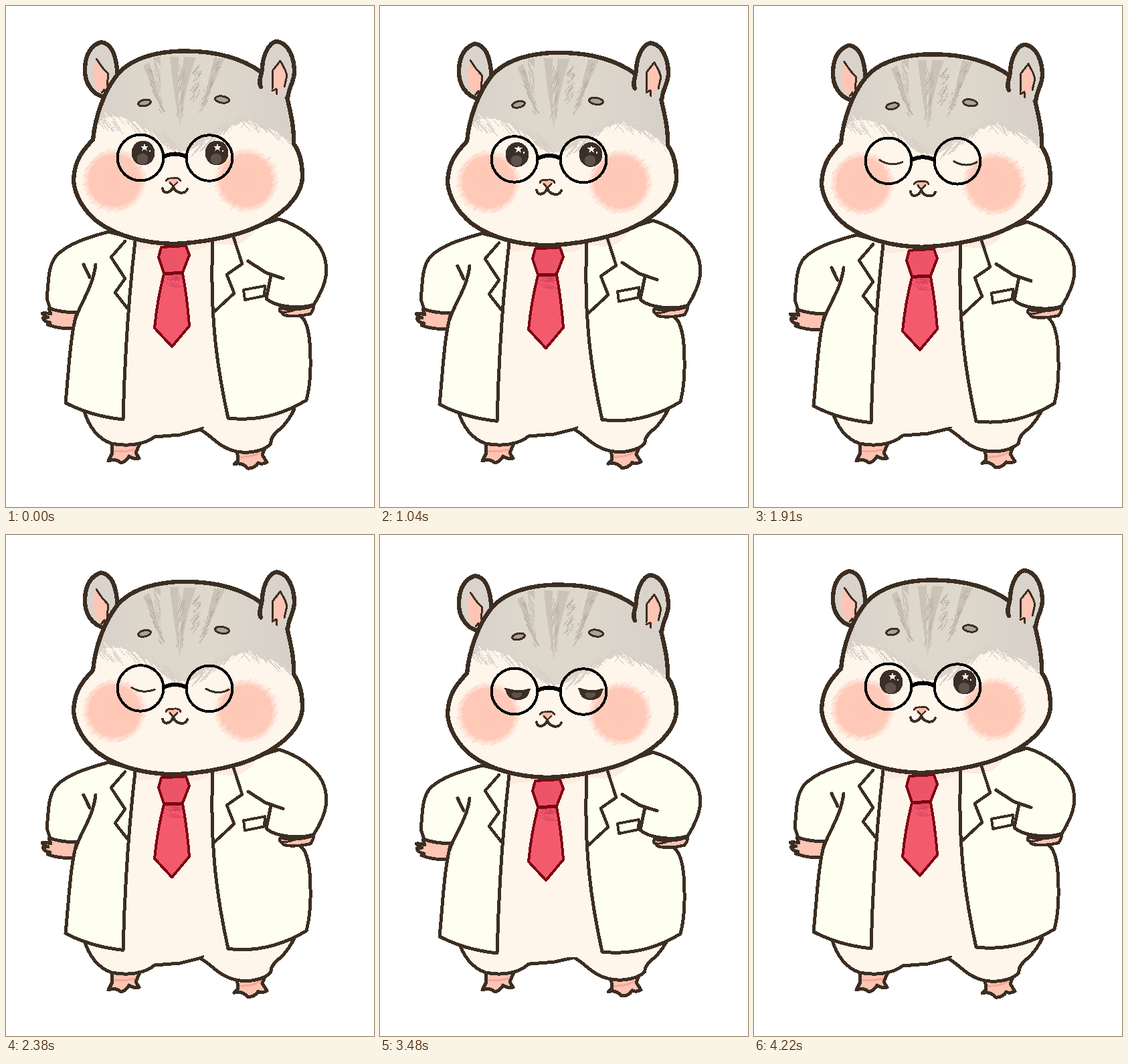
An HTML page that plays this animation: 550x750 px, repeating every 4.29 s.

```html
<!DOCTYPE html>
<html lang="en">
<head>
<meta charset="utf-8">
<title>Hamster in a lab coat</title>
<style>
  html, body { margin: 0; width: 100%; height: 100%; overflow: hidden; background: #fff; }
  svg { display: block; width: 100vw; height: 100vh; shape-rendering: crispEdges; }
  .ink { stroke: #3c2e22; stroke-linecap: round; stroke-linejoin: round; }
  .line { fill: none; }
  .coat { fill: #fefff0; }
  .fur { fill: #fef6eb; }
  .skin { fill: #fec4b4; }
  .tie { stroke: #7d0713; stroke-width: 4; stroke-linejoin: round; }
</style>
</head>
<body>
<svg viewBox="0 0 550 750" fill="none">
  <defs>
    <radialGradient id="blush">
      <stop offset="0" stop-color="#ffc8b6"/>
      <stop offset=".8" stop-color="#ffc9b8"/>
      <stop offset="1" stop-color="#ffd6c8" stop-opacity="0"/>
    </radialGradient>
    <linearGradient id="cap" x1="131" x2="430" y1="0" y2="0" gradientUnits="userSpaceOnUse">
      <stop offset="0" stop-color="#d8d1ca"/>
      <stop offset=".28" stop-color="#ded7cc"/>
      <stop offset=".6" stop-color="#ded7cc"/>
      <stop offset="1" stop-color="#d7d0c9"/>
    </linearGradient>
    <path id="skull" d="M167 102C186 80 215 71 250 68C305 65 350 76 383 100L420 136C425 160 431 180 430 206C440 220 443 236 443 257C441 290 405 322 350 340C315 350 285 355 250 356C205 355 168 345 138 324C115 306 103 283 101 262C102 232 113 218 130 200C133 167 146 128 167 102Z"/>
    <clipPath id="inHead"><use href="#skull"/></clipPath>
    <path id="blade" d="M236 401L264 400Q271 438 274 479L248 510L222 482Q226 440 236 401Z"/>
    <clipPath id="inTie"><use href="#blade"/></clipPath>
    <g id="star"><path d="M0 -6L1.6 -2L5.8 -2L2.5 .8L3.8 5L0 2.5L-3.8 5L-2.500 .8L-5.8 -2L-1.6 -2Z"/><circle cx="8" cy="5" r="1.3"/></g>
  </defs>

  <!-- feet and legs -->
  <g class="ink" stroke-width="5">
    <path class="skin" d="M158 655L159 669L153 681Q164 677 172 684Q180 682 184 674Q191 679 199 677L194 669L200 655Z"/>
    <path class="skin" data-flex="M345 664@-.3L347 680@-.3L341 686@-.3Q352 682@-.3 361 692@-.3Q371 693@-.3 377 684@-.3Q383 687@-.3 390 683@-.3L383 672@-.3L389 657@-.3Z"/>
    <path d="M162 666Q178 668 192 664M350 675Q367 676 380 668" stroke="#f7a695" stroke-width="3"/>
    <path class="fur" data-flex="M116 604C122 624@0 134 647@0 158 655@0C182 660@0 208 656@0 222 645@-.4L260 642@-.4L290 634@-.2C309 644@-.2 317 661@-.2 345 667@-.3C366 671@-.3 387 665@-.3 396 655@-.2C395 646@0 402 639@0 411 632@0Q424 619@0 431 603@0L400 560@0L150 560@0Z"/>
    <path class="line" stroke-width="3" data-flex="M275 638@-.2L295 631@-.1"/>
  </g>

  <!-- left hand -->
  <path class="ink skin" stroke-width="4.8" data-flex="M106 456@.5L64 453@.4L67 461@.4Q60 459@.3 54 460@.3Q58 465@.3 63 466@.3L55 467@.3Q57 473@.4 66 474@.4L62 477@.4C78 483@.4 90 483@.5 103 482@.5Z"/>

  <!-- coat -->
  <g class="ink coat" stroke-width="5">
    <path data-flex="M193 348@1L153 338@1C128 345@1 94 354@.9 75 374@.7C62 391@.6 64 412@.4 61 438@.4L66 453@.4Q84 459@.4 106 459@.4C96 492@.7 94 544@.9 89 594@1Q127 614@1 175 619@1C177 540@1 183 440@1 193 352@1Z"/>
    <path data-flex="M309 350@1L408 319@.9C434 327@.8 462 345@.7 473 368@.6C483 392@.4 481 414@.4 460 447@.5L440 464@.7C451 471@1 455 498@1 455 528@1Q456 563@1 449 590@1C423 606@1 383 623@1 332 617@1C316 544@1 304 465@1 309 350@1Z"/>
    <path class="skin" stroke-width="4.5" data-flex="M410 452@.5Q407 458@.5 414 459@.5Q411 463@.5 424 464@.5Q439 465@.5 455 461@.5Q460 455@.5 460 448@.5C449 454@.5 424 456@.5 410 452@.5Z"/>
    <path class="line" stroke-width="3" data-flex="M414 459@.5Q423 458@.5 432 455@.5"/>
    <path class="line" data-flex="M134 387@1C130 421@.8 111 445@.5 104 468@.5M116 387@1L125 406@.9"/>
    <path class="line" data-flex="M362 382@.9L388 399@.8L414 408@.7M396 403@.7L389 438@.5C400 449@.5 436 455@.5 460 447@.5"/>
  </g>

  <g class="upper">
    <path class="fur" d="M193 345L311 345C307 430 309 500 332 617L310 626L175 620C177 530 183 440 193 345Z"/>
    <path d="M190 349Q240 362 310 351L374 331Q366 352 340 358L306 355Q290 370 272 364L230 362L194 366Z" fill="#feeade"/>
    <path class="ink line" stroke-width="5" d="M193 352C183 440 177 540 175 619M309 350C304 465 316 544 332 617"/>
    <g class="ink line" stroke-width="4.6">
      <path d="M178 352L157 376L178 408L163 429L181 452"/>
      <path d="M340 346L353 386L330 402L341 430L312 457"/>
      <path class="coat" d="M355 425L387 419L386 434L357 440Z" stroke-width="4"/>
    </g>
    <path class="tie" d="M232 361L269 359L274 373L264 399L236 400L228 376Z" fill="#ee5468"/>
    <use href="#blade" class="tie" fill="#f35b6d"/>
    <g id="tieShade" clip-path="url(#inTie)"></g>
    <use href="#blade" class="tie"/>
  </g>

  <!-- head -->
  <g class="upper">
    <path class="ink" fill="#dad3cb" stroke-width="6.4" d="M149 137C127 133 117 113 118 93C119 69 130 58 142 54C156 56 165 69 167 107"/>
    <path class="skin" d="M134 80L144 92L153 101L155 112L148 134L137 126Q127 108 134 80Z"/>
    <path class="ink line" stroke-width="3" d="M135 79L144 92L153 102L151 119M143 130L147 125L147 134"/>
    <use href="#skull" class="fur"/>
    <g clip-path="url(#inHead)">
      <path d="M125 190L145 168Q174 161 204 180L258 216Q278 221 297 200Q325 181 357 173Q388 174 432 207L440 50L125 50Z" fill="url(#cap)"/>
      <g id="edge"></g>
      <g fill="#cbc3b6">
        <path d="M205 90Q218 120 235 164Q226 120 214 84Z"/>
        <path d="M221 77L231 76Q229 115 234 150Q221 112 221 77Z"/>
        <path d="M245 76L258 76Q256 118 260 182Q250 126 245 76Z"/>
        <path d="M266 76L284 77Q270 112 260 178Q260 118 266 76Z"/>
        <path d="M311 77L327 79Q313 108 290 163Q301 118 311 77Z"/>
      </g>
      <g id="stripes"></g>
      <circle cx="162" cy="261" r="48" fill="url(#blush)"/>
      <circle cx="359" cy="261" r="48" fill="url(#blush)"/>
      <g id="blushEdge"></g>
    </g>
    <use href="#skull" class="ink" stroke-width="6.4"/>
    <path fill="#dad3cb" d="M381 122L383 92L392 65L405 53L422 60L432 90L429 112L420 137Q400 134 381 122Z"/>
    <path class="ink line" stroke-width="6.4" d="M381 121C376 113 383 102 383 92C384 73 393 55 404 53C422 55 431 77 431 99C430 116 422 122 421 139"/>
    <path class="skin" d="M399 96L410 82L420 103Q416 127 401 133Q395 116 399 96Z"/>
    <path class="ink line" stroke-width="3" d="M398 124L399 96L410 82L417 95L420 104L416 121M398 127L404 124L405 132"/>

    <g class="ink" fill="#aaa197" stroke-width="3">
      <ellipse cx="207" cy="145" rx="9.5" ry="4.6" transform="rotate(-12 207 145)"/>
      <ellipse cx="323" cy="140" rx="10.5" ry="5" transform="rotate(8 323 140)"/>
    </g>

    <g class="eyes">
      <g fill="#3b2e29"><ellipse cx="205" cy="220" rx="17.5" ry="18.5"/><ellipse cx="315" cy="220" rx="17.5" ry="18.5"/></g>
      <g fill="#5f524a"><ellipse cx="204" cy="229" rx="8.5" ry="8"/><ellipse cx="314" cy="229" rx="8.5" ry="8"/></g>
      <g fill="#fff"><use href="#star" x="207" y="212"/><use href="#star" x="316" y="212"/></g>
    </g>
    <g class="eyes">
      <path d="M187 223Q206 230 224 224Q222 240 206 240Q190 240 187 223ZM297 223Q315 230 333 224Q331 240 315 240Q299 240 297 223Z" fill="#3b2e29"/>
      <path d="M196 230Q205 227 213 230Q211 237 204 237Q198 237 196 230ZM306 230Q315 227 323 230Q321 237 314 237Q308 237 306 230Z" fill="#5f524a"/>
      <path class="ink line" stroke-width="3" d="M187 223Q206 230 224 224M297 223Q315 230 333 224"/>
    </g>
    <path class="eyes ink line" stroke-width="3" d="M188 226Q204 236 222 229M299 228Q317 238 333 229"/>

    <path d="M240 259Q250 255 260 260Q257 268 250 270Q242 267 240 259Z" fill="#fdbba9"/>
    <path class="ink line" stroke-width="2.8" d="M239 262Q241 257 249 258Q259 256 261 262M245 264L250 270L256 264"/>
    <path class="ink line" stroke-width="4" d="M234 273C235 283 247 280 250 270C253 281 268 283 271 274"/>
    <g stroke="#000" stroke-width="4">
      <circle cx="201" cy="227" r="34.3"/>
      <circle cx="304" cy="227.5" r="34.3"/>
      <path d="M235 226Q252 217 271 226" stroke-width="6"/>
    </g>
  </g>
</svg>
<script>
const $ = s => document.querySelector(s);
const all = s => [...document.querySelectorAll(s)];

let seed = 11;
const rnd = (a, b) => {
  seed = (seed * 16807) % 2147483647;
  return a + (b - a) * seed / 2147483647;
};

// Pencil strokes scattered around the line a-b
function hatch(id, a, b, n, spread, dx, dy, color, width = 1.3) {
  let d = '';
  for (let i = 0; i < n; i++) {
    const k = rnd(0, 1), len = rnd(.5, 1.1);
    const x = a[0] + (b[0] - a[0]) * k + rnd(-spread, spread) - dx * len / 2;
    const y = a[1] + (b[1] - a[1]) * k + rnd(-spread, spread) - dy * len / 2;
    d += `M${x.toFixed(1)} ${y.toFixed(1)}l${(dx * len).toFixed(1)} ${(dy * len).toFixed(1)}`;
  }
  $(id).insertAdjacentHTML('beforeend', `<path d="${d}" stroke="${color}" stroke-width="${width}"/>`);
}

const grey = '#d9d1c8', cream = '#fef6eb';
hatch('#edge', [138, 176], [200, 180], 42, 5, 14, 18, grey);
hatch('#edge', [150, 172], [205, 188], 35, 5, 14, 18, cream);
hatch('#edge', [200, 180], [256, 214], 40, 6, 16, 20, grey);
hatch('#edge', [280, 214], [350, 174], 50, 6, -15, 18, grey);
hatch('#edge', [300, 208], [355, 180], 28, 5, -15, 18, cream);
hatch('#edge', [355, 172], [428, 204], 50, 5, 14, 16, grey);
hatch('#edge', [365, 180], [428, 210], 28, 4, 14, 16, cream);

const dark = '#b9b0a0', pale = '#e2dcd1';
hatch('#stripes', [212, 92], [232, 156], 26, 4, 6, 10, dark, 1);
hatch('#stripes', [226, 82], [231, 135], 18, 3, 4, 9, pale, 1);
hatch('#stripes', [263, 90], [260, 168], 24, 5, -4, 12, dark, 1);
hatch('#stripes', [286, 94], [282, 140], 26, 5, -7, 9, dark, 1);
hatch('#stripes', [316, 86], [293, 155], 26, 4, -7, 9, dark, 1);
hatch('#stripes', [305, 82], [294, 130], 16, 4, -5, 9, pale, 1);

for (const cx of [162, 359])
  for (let i = 0; i < 40; i++) {
    const t = i * Math.PI / 20;
    const p = [cx + 43 * Math.cos(t), 261 + 43 * Math.sin(t)];
    hatch('#blushEdge', p, p, 2, 3, 9, -7, i % 2 ? '#ffd0c0' : '#ffe3d7', 1);
  }
hatch('#tieShade', [237, 406], [266, 407], 26, 4, 10, 4, '#d94460', 1.2);
hatch('#tieShade', [240, 415], [267, 421], 12, 4, 12, 3, '#dd4760', 1);

// Breathing steps: time, depth, lids (0 open, 1 half, 2 shut)
const LOOP = 4290, drop = [0, 2.4, 4.8, 7];
const steps = [[0, 0, 0], [230, 1, 0], [400, 2, 0], [570, 3, 0], [870, 2, 0], [1040, 1, 0], [1210, 0, 0]];
for (const t of [1540, 2880])
  steps.push([t, 0, 1], [t + 70, 0, 2], [t + 200, 1, 2], [t + 370, 2, 2],
    [t + 600, 3, 1], [t + 670, 2, 2], [t + 840, 1, 2], [t + 1010, 0, 2]);
steps.push([4220, 0, 0]);

const upper = all('.upper'), eyes = all('.eyes');
const flex = all('[data-flex]').map(el => ({ el, path: el.dataset.flex }));

function draw(time) {
  const t = time % LOOP;
  const [, depth, lids] = steps.filter(s => s[0] <= t).pop();
  const d = drop[depth];
  upper.forEach(g => g.setAttribute('transform', `translate(0 ${d})`));
  eyes.forEach((g, i) => g.setAttribute('visibility', i === lids ? 'visible' : 'hidden'));
  // "y@w" means y sinks by w times the drop
  for (const { el, path } of flex)
    el.setAttribute('d', path.replace(/([\d.]+)@(-?[\d.]+)/g, (m, y, w) => (+y + w * d).toFixed(1)));
}

const start = performance.now();
function tick() {
  draw(performance.now() - start);
  requestAnimationFrame(tick);
}
tick();
</script>
</body>
</html>
```
